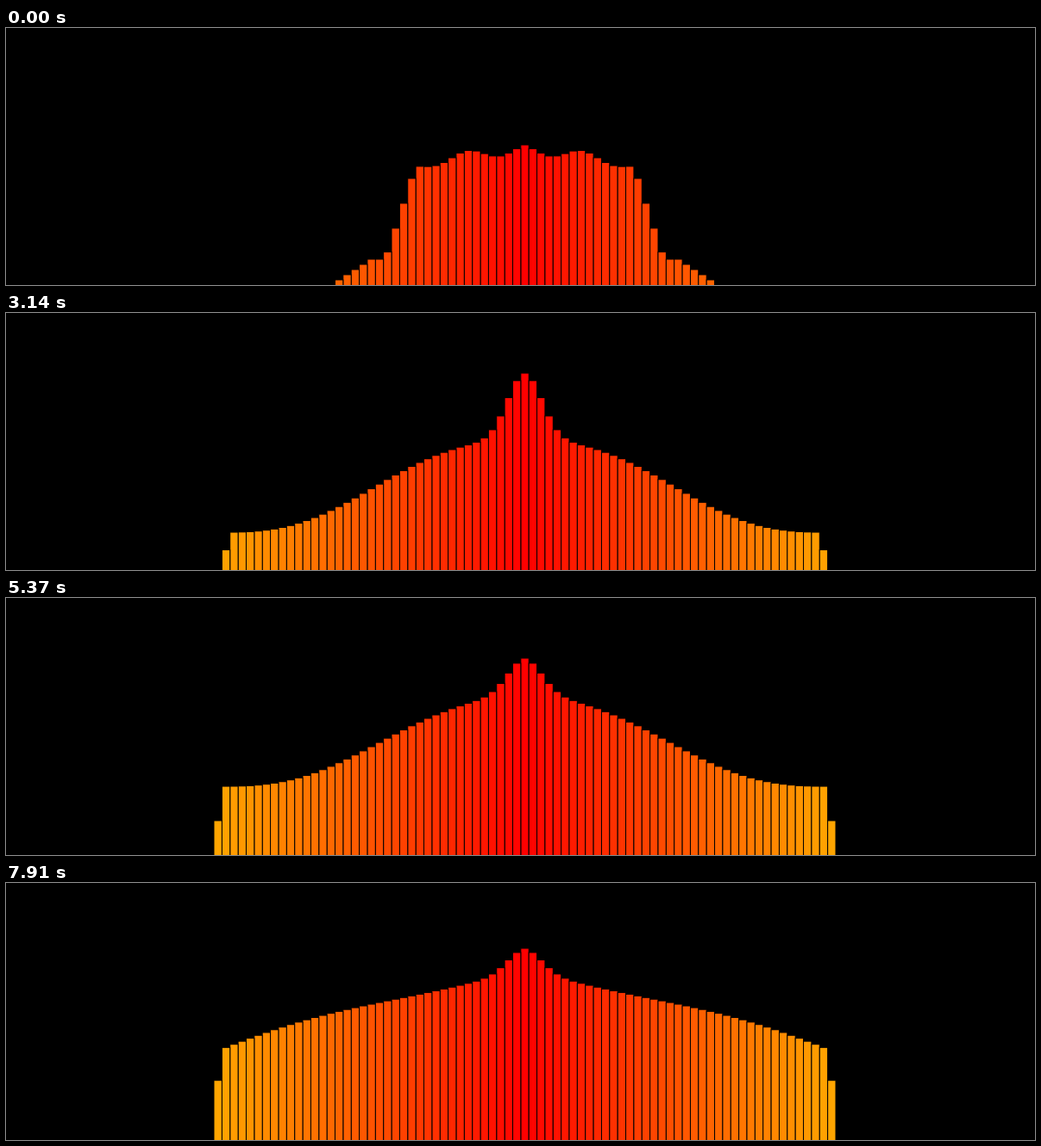
Write an HTML page with a canvas that moves like this. It is 1193 px wide and 299 px high and loops after 7990 ms.

```html
<!DOCTYPE html>
<html lang="en">
<head>
<meta charset="utf-8">
<title>Spectrum bars</title>
<style>
  html, body { margin: 0; width: 100%; height: 100%; overflow: hidden; background: #000; }
  canvas { display: block; }
</style>
</head>
<body>
<canvas id="stage" width="1193" height="299"></canvas>
<script>
const ctx = document.getElementById('stage').getContext('2d');
const LOOP = 7990, STEP = 76.7, LAST = 103;
const FLOOR = 299, CENTER = 601.5, PITCH = 9.364, PEAK = 238, BARS = 38;

// Outline of the spectrum over time: a slope from base to end, bent by bend and
// sway, with a spike and ripples at the centre, falling to zero at reach.
const poses = [
  { at: 0, spike: -14, base: 168, end: 80, bend: 0, sway: 0, ripple: 9, reach: 18.5, soft: 5 },
  { at: 19, spike: 30, base: 174, end: 110, bend: 0, sway: 0, ripple: 16, reach: 18, soft: 5 },
  { at: 22, spike: 35, base: 168, end: 56, bend: 0, sway: 8, ripple: 0, reach: 38.5, soft: 1.5 },
  { at: 41, spike: 74, base: 155, end: 44, bend: -5, sway: 15, ripple: 0, reach: 37.8, soft: 1.5 },
  { at: 59, spike: 37, base: 178, end: 58, bend: 3, sway: 8, ripple: 0, reach: 38.5, soft: 1.5 },
  { at: 70, spike: 37, base: 192, end: 80, bend: -10, sway: 12, ripple: 0, reach: 38.75, soft: 1.5 },
  { at: 85, spike: 52, base: 196, end: 104, bend: 6, sway: -8, ripple: 0, reach: 39, soft: 1.5 },
  { at: 103, spike: 25, base: 198, end: 104, bend: 7, sway: -3, ripple: 0, reach: 39, soft: 1.5 }
];

const mix = (a, b, u) => a + (b - a) * u;
const clamp = (v, low, high) => Math.min(high, Math.max(low, v));

function poseAt(step) {
  const i = Math.max(1, poses.findIndex(pose => pose.at >= step));
  const from = poses[i - 1], to = poses[i];
  const u = (step - from.at) / (to.at - from.at);
  const pose = { pulse: Math.sin(Math.PI * u) };
  for (const key in from) pose[key] = mix(from[key], to[key], u);
  return pose;
}

function barHeight(k, step, p) {
  const x = k / BARS;
  const slope = mix(p.base, p.end, x) + p.bend * 4 * x * (1 - x) + p.sway * Math.sin(2 * Math.PI * x);
  const middle = p.spike * Math.exp(-k * k / 9) + p.ripple * Math.cos(.85 * k) * Math.exp(-k / 12);
  const beat = p.pulse * (4 * Math.sin(.9 * k + 1.1 * step) + .04 * slope);
  const body = (slope + middle + beat) * clamp((p.reach - k) / p.soft, 0, 1);
  const foot = clamp(6 * (24 - k), 0, 30);
  return clamp(body, foot, PEAK);
}

function draw(now) {
  const step = Math.min(LAST, Math.floor((now % LOOP + 10) / STEP));
  const pose = poseAt(step);
  ctx.fillStyle = '#000';
  ctx.fillRect(0, 0, 1193, FLOOR);
  for (let k = 0; k <= BARS; k++) {
    const h = barHeight(k, step, pose);
    ctx.fillStyle = `rgb(255, ${Math.round(165 * k / BARS)}, 0)`;
    for (const side of [-1, 1]) {
      const bar = [CENTER + (side * k - .5) * PITCH, FLOOR - h, PITCH, h + 2];
      ctx.fillRect(...bar);
      ctx.strokeRect(...bar);
    }
  }
}

let start;
function tick(now) {
  start ??= now;
  draw(now - start);
  requestAnimationFrame(tick);
}
draw(0);
requestAnimationFrame(tick);
</script>
</body>
</html>
```
